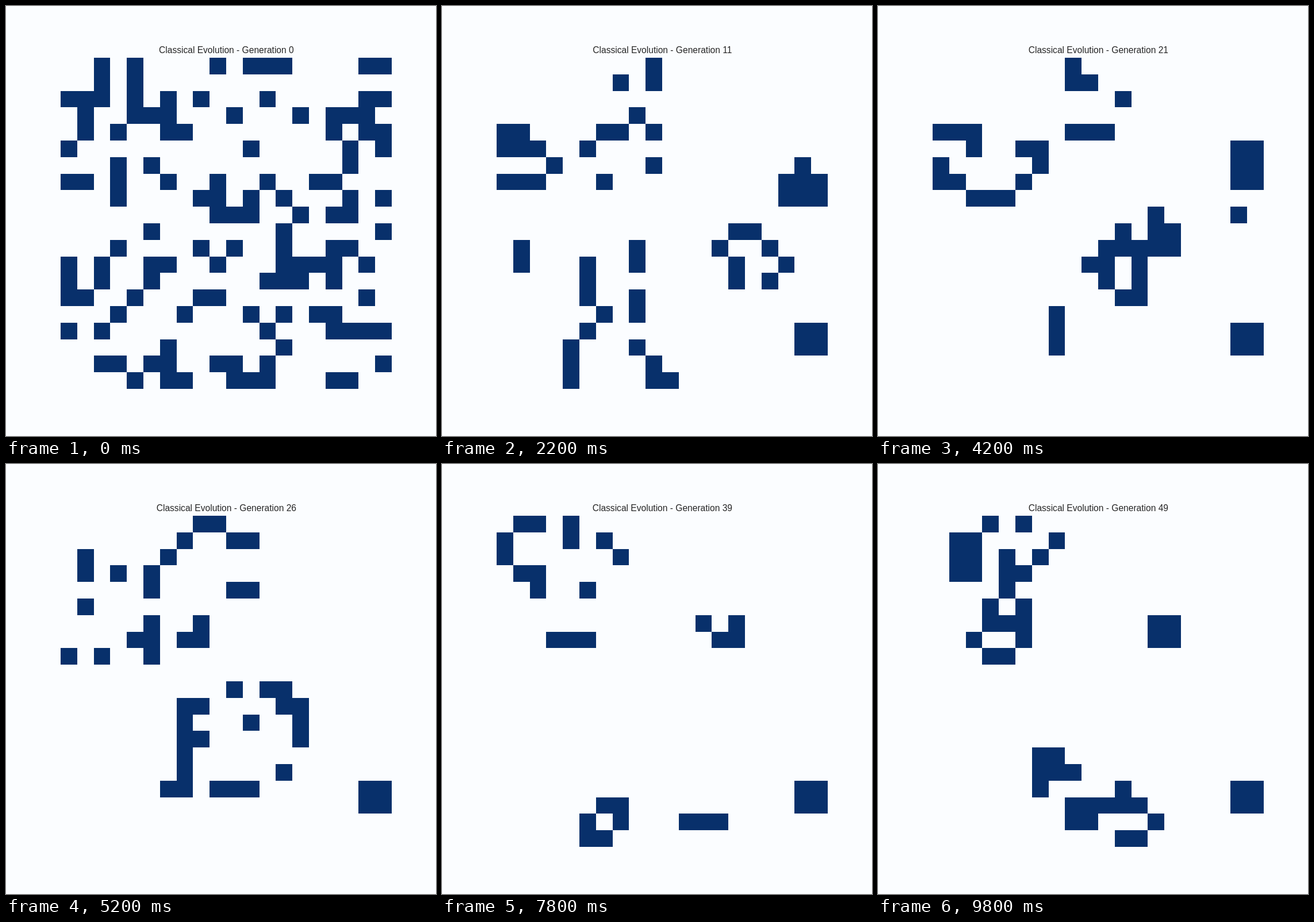
An HTML page with a canvas for the animation above (10 s loop, 748x748 px).

```html
<!DOCTYPE html>
<html lang="en">
<head>
<meta charset="utf-8">
<title>Classical Evolution</title>
<style>
  html, body { margin: 0; width: 100%; height: 100%; overflow: hidden; background: #fbfdff; }
  canvas { display: block; }
</style>
</head>
<body>
<canvas id="stage" width="748" height="748"></canvas>
<script>
const SIZE = 20, STEPS = 50, STEP_MS = 200;
const LEFT = 95, TOP = 90, CELL = 28.8;

// Starting population in run-length Life notation: b = dead, o = alive, $ = next row.
const SEED = [
  '2bobo4bob3o4b2o', '2bobo', '3obobobo3bo5b2o', 'bo2b3o3bo3bob3o',
  'bobo2b2o8bob2o', 'o10bo5bobo', '3bobo11bo', '2obo2bo2bo2bo2b2o',
  '3bo4b2obobo3bobo', '9b3o2bob2o', '5bo7bo5bo', '3bo4bobo2bo2b2o',
  'obo2b2o2bo3b4obo', 'obo2bo6b3obo', '2o2bo3b2o8bo', '3bo3bo3bobob2o',
  'obo9bo3b4o', '6bo6bo', '2b2ob2o2b2obo6bo', '4bob2o2b3o3b2o'
].join('$');

function parse(pattern) {
  return pattern.split('$').map(line => {
    const row = [];
    for (const [, run, kind] of line.matchAll(/(\d*)([bo])/g)) {
      for (let i = 0; i < (+run || 1); i++) row.push(kind === 'o' ? 1 : 0);
    }
    while (row.length < SIZE) row.push(0);
    return row;
  });
}

const wrap = i => (i + SIZE) % SIZE;

function neighbours(grid, r, c) {
  let sum = -grid[r][c];
  for (let dr = -1; dr <= 1; dr++) {
    for (let dc = -1; dc <= 1; dc++) sum += grid[wrap(r + dr)][wrap(c + dc)];
  }
  return sum;
}

// One step of Conway's rules on a torus.
function evolve(grid) {
  return grid.map((row, r) => row.map((alive, c) => {
    const n = neighbours(grid, r, c);
    return n === 3 || (alive && n === 2) ? 1 : 0;
  }));
}

const generations = [parse(SEED)];
while (generations.length < STEPS) generations.push(evolve(generations.at(-1)));

const ctx = document.getElementById('stage').getContext('2d');
const edge = (start, i) => Math.round(start + i * CELL);

function draw(step) {
  ctx.fillStyle = '#fbfdff';
  ctx.fillRect(0, 0, 748, 748);

  ctx.fillStyle = '#08306b';
  generations[step].forEach((row, r) => row.forEach((alive, c) => {
    if (!alive) return;
    const x = edge(LEFT, c), y = edge(TOP, r);
    ctx.fillRect(x, y, edge(LEFT, c + 1) - x, edge(TOP, r + 1) - y);
  }));

  ctx.fillStyle = '#262626';
  ctx.font = '15.58px "Liberation Sans", Arial, sans-serif';
  ctx.textAlign = 'center';
  ctx.fillText('Classical Evolution - Generation ' + step, 383.35, 82);
}

const start = performance.now();

function tick() {
  const elapsed = performance.now() - start;
  draw(Math.floor(elapsed / STEP_MS) % STEPS);
  requestAnimationFrame(tick);
}
tick();
</script>
</body>
</html>
```
